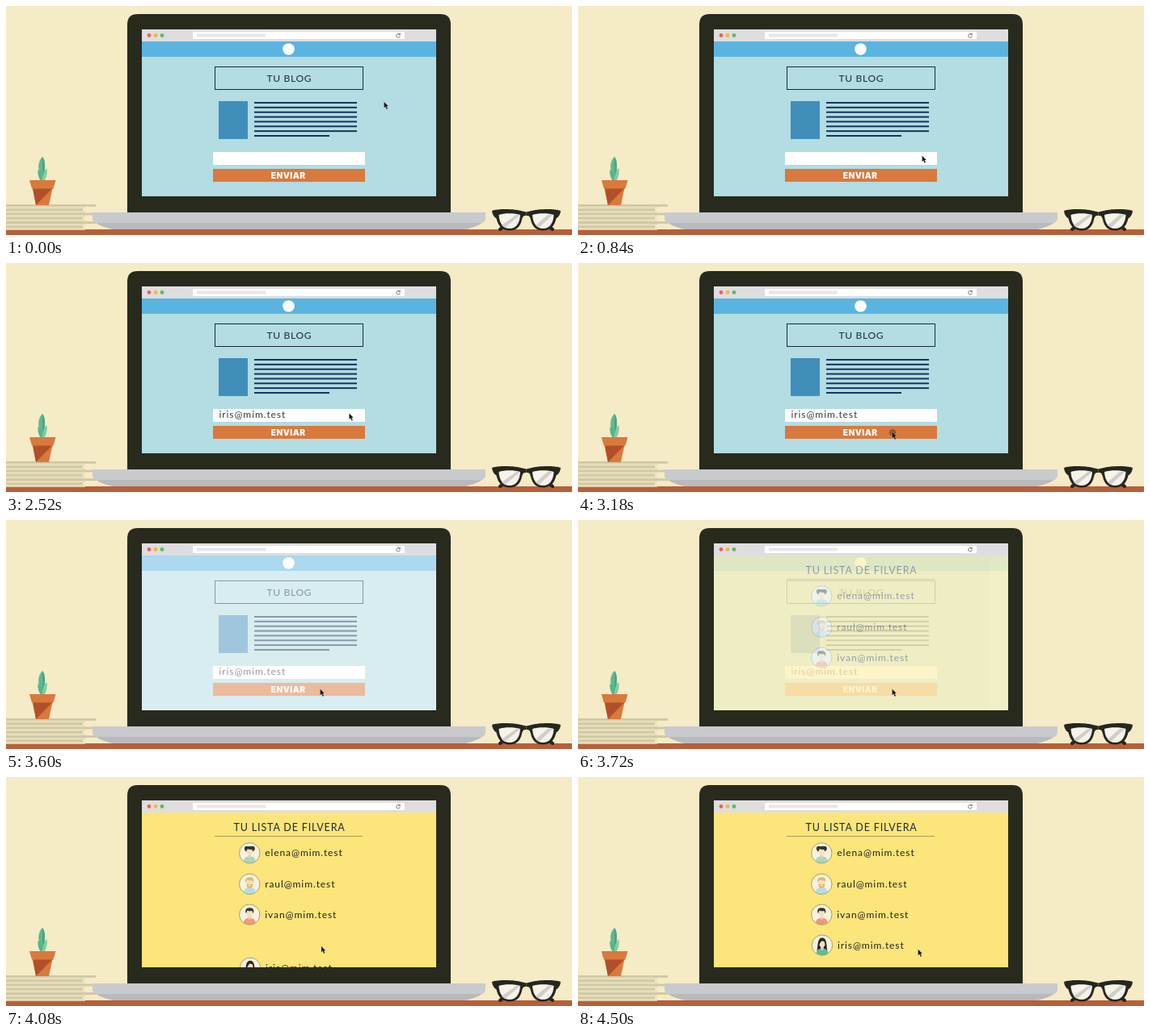
Animation, 700 px wide and 284 px high, one loop 5400 ms. Source, as an HTML page:

```html
<!DOCTYPE html>
<html lang="es">
<head>
<meta charset="utf-8">
<title>Tu lista</title>
<style>
  html, body { margin: 0; width: 100%; height: 100%; overflow: hidden; background: #f5ebc7; }
  svg { display: block; width: 100%; height: 100%; }
  text { font-family: Lato, "Open Sans", sans-serif; font-size: 12px; letter-spacing: .9px; white-space: pre; }
  .title { letter-spacing: .7px; fill: #1d2b35; }
  .btn { font: 900 10.2px Inter, Lato, sans-serif; letter-spacing: .45px; fill: #fff; }
</style>
</head>
<body>
<svg viewBox="0 0 700 284">
  <defs>
    <clipPath id="screen"><rect x="168" y="44" width="364" height="192"/></clipPath>
    <clipPath id="disc"><circle r="12.4"/></clipPath>
    <g id="lens">
      <path d="M601 254C609 251 630 251.500 639 254.500L643.500 255.500V260C640 259.500 639 261 638 265C636 274 631 278.500 623 278.500C613 278.500 608.500 272 606.500 263.500C603 261.500 601.500 258 601 254Z" fill="#25271d"/>
      <path d="M609.500 259C616 256.500 629 256.500 636 259C635.500 269 631 276 623 276C614 276 610 268.500 609.500 259Z" fill="#f5f3ea"/>
    </g>
  </defs>

  <rect width="700" height="284" fill="#f5ebc7"/>
  <rect y="277" width="700" height="7" fill="#b85f3a"/>
  <g id="papers"></g>

  <!-- plant -->
  <path d="M45 187C49 191 49 204 45.500 213C39 206 38 194 45 187Z" fill="#5fb990"/>
  <path d="M45 187C49 191 49 204 45.500 213Z" fill="#4ba580"/>
  <path d="M39.500 203C43 205 46 210 46 217H43C40 213 39 208 39.500 203Z" fill="#58b38b"/>
  <path d="M50.500 201C51.500 208 49.500 214 47 217H44.500C45 210 47 204 50.500 201Z" fill="#83cba5"/>
  <path d="M33 226H57.500L53 247H37Z" fill="#d9793d"/>
  <path d="M33 226H57.500L37 247Z" fill="#b04f2a"/>
  <path d="M29 216H61.500L58.500 226.500H32Z" fill="#d9793d"/>

  <!-- laptop -->
  <path d="M150 256V23Q150 10 163 10H537Q550 10 550 23V256Z" fill="#282a1d"/>
  <path d="M107 256H593V264Q590 272 568 277H132Q110 272 107 264Z" fill="#b9babd"/>
  <path d="M107 256H593V264Q592 267 589 269H111Q108 267 107 264Z" fill="#c9cacd"/>

  <!-- glasses -->
  <path d="M611 277L632 262M676 277L655 262" stroke="#25271d" stroke-width="4" stroke-linecap="round"/>
  <use href="#lens"/>
  <use href="#lens" transform="matrix(-1 0 0 1 1287 0)"/>
  <path d="M613 272L631 259H636L617 275ZM655 272L670 259H676L659 275Z" fill="#cfcec8"/>

  <!-- browser -->
  <rect x="168" y="29" width="364" height="15" fill="#dedee0"/>
  <circle cx="177" cy="36.500" r="2.400" fill="#f15f58"/>
  <circle cx="185" cy="36.500" r="2.400" fill="#f4b63f"/>
  <circle cx="193" cy="36.500" r="2.400" fill="#5dbb5c"/>
  <rect x="231" y="32" width="262" height="9" rx="1" fill="#fff"/>
  <rect x="236" y="34.500" width="85" height="4" fill="#e6e6eb"/>
  <path d="M486.800 35.300A2.300 2.300 0 1 0 487.300 37.200M487.300 33.800V35.700H485.300" fill="none" stroke="#555" stroke-width=".8"/>

  <g clip-path="url(#screen)">
    <rect x="168" y="44" width="364" height="192" fill="#fff"/>
    <g id="blog">
      <rect x="168" y="44" width="364" height="192" fill="#b3dce3"/>
      <rect x="168" y="44" width="364" height="19" fill="#5ab4df"/>
      <circle cx="349.500" cy="53.500" r="7.300" fill="#fff"/>
      <rect x="258.500" y="75.500" width="183" height="28" fill="none" stroke="#1d2b35"/>
      <text class="title" x="322.500" y="94">TU BLOG</text>
      <rect x="263" y="118" width="36" height="47" fill="#428eba"/>
      <g id="lines" fill="#14365a"></g>
      <rect x="256" y="181" width="188" height="16" fill="#fff"/>
      <text id="field" x="263.500" y="192" fill="#3a3a3a"></text>
      <rect x="256" y="202" width="188" height="16" fill="#d9793d"/>
      <text class="btn" x="327.800" y="213.500">ENVIAR</text>
    </g>
    <g id="list">
      <rect x="168" y="44" width="364" height="192" fill="#fce57a"/>
      <text class="title" x="281.500" y="67" style="font-size:12.500px;letter-spacing:.85px">TU LISTA DE FILVERA</text>
      <path d="M258 73.500H441" stroke="#a89c58"/>
      <g id="rows"></g>
    </g>
    <circle id="tap" fill="#4a3a30" opacity=".5"/>
  </g>
  <path id="cursor" d="M0 0V7.700L1.800 6.200L3.200 9.400L4.600 8.800L3.300 5.700L5.400 5.500Z" fill="#111" stroke="#fff" stroke-opacity=".45" stroke-width=".5"/>
</svg>

<script>
const LOOP = 5400, STEP = 60;
const MAIL = 'iris@mim.test';
const $ = id => document.getElementById(id);

const rect = (x, y, w, h, fill = '') =>
  `<rect x="${x}" y="${y}" width="${w}" height="${h}"${fill && ` fill="${fill}"`}/>`;

$('papers').innerHTML = [0, 1, 2, 3, 4, 5].map(i => {
  const y = 246 + i * 5.3, end = i % 2 ? 95 : 111;
  return rect(0, y, end, 2.8, '#cfc8a4') + rect(0, y + 2.8, 98, 2.5, '#e6deba');
}).join('');

$('lines').innerHTML = [...Array(8).keys()]
  .map(i => rect(307, 119 + i * 5.86, i < 7 ? 127 : 93, 2)).join('');

// Little portraits: hair behind, shirt, neck and face, hair in front
const SKIN = '#f7e0bd', DARK = '#3a352e', BLOND = '#dcbc6c';
const face = `<path d="M-1.800 1H1.800V5L0 6.500L-1.800 5Z" fill="#edcfa8"/><ellipse cy="-1.800" rx="3.700" ry="4.700" fill="${SKIN}"/>`;
const shirt = fill => `<path d="M-7.500 13C-7.500 6 -5.500 5 -2 4.200H2C5.500 5 7.500 6 7.500 13Z" fill="${fill}"/>`;
const crop = fill => `<path d="M-4.300 -1.500C-6.500 -5 -4 -9 0 -8.300C4 -9.500 6.500 -5 4.300 -1.500L3.300 -4.500Q0 -4 -3 -5Z" fill="${fill}"/>`;
const people = [
  ['elena@mim.test', 301.3, 94.3, `<circle cx="-3.500" cy="-5.500" r="3" fill="${DARK}"/><circle cx="3.500" cy="-5.500" r="3" fill="${DARK}"/>` + shirt('#a8d5c5') + face + crop(DARK)],
  ['raul@mim.test', 301.3, 132.8, shirt('#b5dcea') + face + crop(BLOND) +
    `<path d="M-4 -.500Q0 1.500 4 -.500Q4 5 0 5Q-4 5 -4 -.500Z" fill="${BLOND}"/><path d="M-1.500 1.700H1.500" stroke="#fff" stroke-width=".9"/>`],
  ['ivan@mim.test', 301.3, 170.7, shirt('#f0987a') + face + crop(DARK)],
  [MAIL, 302, 208.6, `<path d="M-6.500 7C-5 2 -6.500 -9 0 -9C6.500 -9 5 2 6.500 7Z" fill="#26282a"/>` + shirt('#5fbd97') + face +
    '<path d="M-4.200 0C-5 -8 -1 -8.500 0 -8C2 -8.500 5 -8 4.200 0L2.500 -4.800L-1 -5.200Z" fill="#26282a"/>']
];
$('rows').innerHTML = people.map(([mail, x, y, art]) =>
  `<g><g transform="translate(${x} ${y})"><circle r="12.700" fill="#f6f2df"/>
   <g clip-path="url(#disc)">${art}</g><circle r="12.700" fill="none" stroke="#a59f6c"/></g>
   <text x="${x + 19}" y="${y + 3.9}" fill="#222">${mail}</text></g>`).join('');
const lastRow = $('rows').lastElementChild;

const ramp = (t, a, b) => Math.min(1, Math.max(0, (t - a) / (b - a)));
const inOut = k => k < .5 ? 4 * k ** 3 : 1 - 4 * (1 - k) ** 3;
const outCubic = k => 1 - (1 - k) ** 3;

const moves = [
  [0, 720, 425.5, 185.5],
  [2400, 3000, 388.5, 209.5],
  [3960, 4500, 420.5, 213.5]
];

function pointer(t) {
  let x = 467.5, y = 118.8;
  for (const [a, b, tx, ty] of moves) {
    const k = inOut(ramp(t, a, b));
    x += (tx - x) * k;
    y += (ty - y) * k;
  }
  return [x, y];
}

function typed(t) {
  if (t < 1140) return 0;
  if (t < 1200) return 1;
  return Math.round(2 + (MAIL.length - 2) * ramp(t, 1200, 1800));
}

function draw(time) {
  const t = Math.floor((time % LOOP) / STEP) * STEP;
  const [x, y] = pointer(t);
  $('cursor').setAttribute('transform', `translate(${x} ${y})`);
  $('field').textContent = MAIL.slice(0, typed(t));
  $('blog').setAttribute('opacity', 1 - ramp(t, 3300, 3900));
  $('list').setAttribute('opacity', ramp(t, 3600, 3900));
  lastRow.setAttribute('transform', `translate(0 ${42 * (1 - outCubic(ramp(t, 4020, 4500)))})`);
  const tap = $('tap');
  tap.setAttribute('cx', x + .5);
  tap.setAttribute('cy', y + .8);
  tap.setAttribute('r', Math.max(0, 6 * Math.sin(Math.PI * ramp(t, 2820, 3300))));
}

const start = performance.now();
function tick() {
  draw(performance.now() - start);
  requestAnimationFrame(tick);
}
tick();
</script>
</body>
</html>
```
